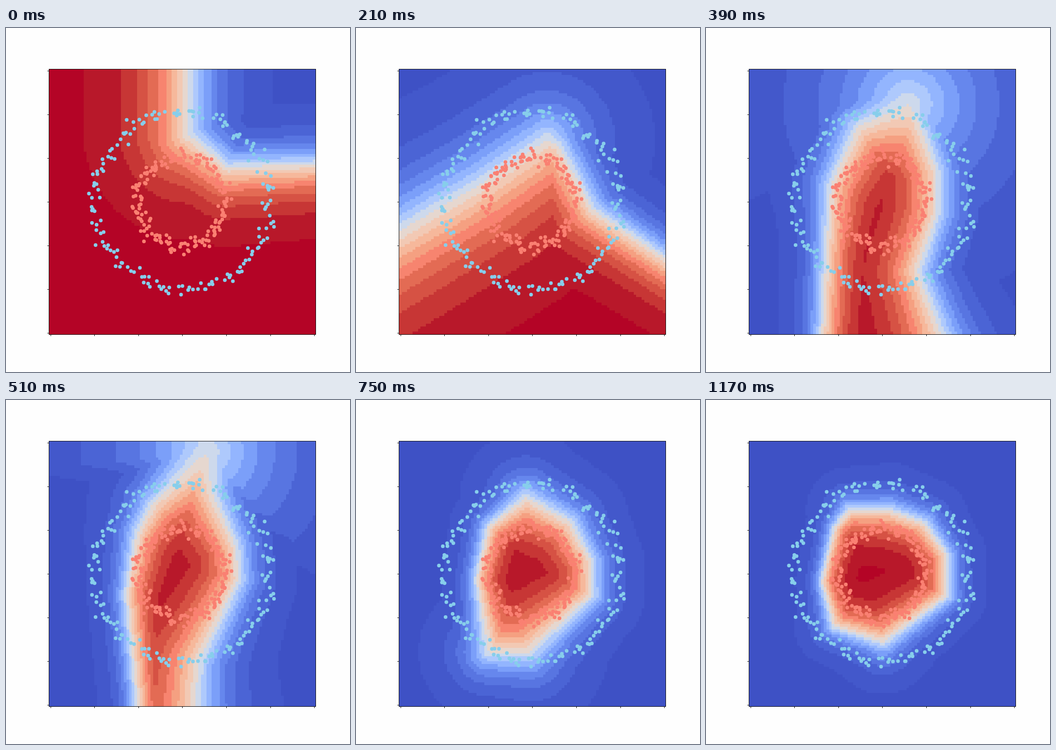
Write an HTML page with a canvas that moves like this. It is 748 px wide and 748 px high and loops after 1.2 s.

```html
<!DOCTYPE html>
<html lang="en">
<head>
<meta charset="utf-8">
<title>Decision boundary</title>
<style>
  html, body { margin: 0; width: 100%; height: 100%; overflow: hidden; background: #fefefe; }
  canvas { display: block; }
</style>
</head>
<body>
<canvas id="stage" width="748" height="748"></canvas>
<script>
const STEP = 30, STEPS = 40, GRID = 100;
const BOX = { x: 94, y: 90, w: 579, h: 576 };
const ctx = document.getElementById('stage').getContext('2d');

// Diverging colour bands, narrower towards both ends
const colors = ('3b4cc0 3e51c5 4358cb 4b64d5 5875e1 6687ed 7b9ff9 93b5fe aec9fc cdd9ec ' +
  'e6d7cf f2c9b4 f6b89b f5a081 f7846f e36b54 d65244 c73635 b8182a b40426').split(' ')
  .map(hex => [0, 2, 4].map(i => parseInt(hex.slice(i, i + 2), 16)));

function colorOf(score) {
  const p = 1 / (1 + Math.exp(-score));
  const eased = Math.acos(1 - 2 * p) / Math.PI;
  return colors[Math.round(eased * (colors.length - 1))];
}

// Boundary at some steps of the training: corner x, y and steepness there.
// The score grows with the distance from the boundary, positive inside.
const below = [[900, 1500, .04], [-900, 1500, .04]];
const states = [
  { step: 0, corners: [
    [-900, -900, .028], [402, -900, .028], [397, 232, .028], [482, 303, .037],
    [900, 288, .042], ...below] },
  { step: 3, corners: [
    [-900, -900, .024], [150, -900, .024], [335, 190, .024], [355, 242, .028],
    [440, 268, .033], [510, 335, .04], [900, 404, .041], ...below] },
  { step: 7, corners: [
    [-900, 1018, .017], [270, 340, .021], [415, 243, .022], [440, 255, .035],
    [515, 395, .038], [900, 655, .045], ...below] },
  { step: 13, corners: [
    [245, 800, .058], [262, 480, .05], [272, 340, .038], [330, 215, .03],
    [440, 165, .012], [458, 195, .03], [500, 310, .036], [502, 400, .036],
    [460, 530, .036], [560, 800, .024]] },
  { step: 17, corners: [
    [300, 800, .06], [262, 420, .06], [285, 290, .045], [320, 225, .036],
    [437, 112, .012], [447, 200, .03], [500, 320, .04], [505, 390, .04],
    [418, 570, .03], [405, 800, .022]] },
  { step: 25, corners: [
    [262, 390, .07], [288, 275, .06], [370, 212, .036], [465, 265, .04],
    [511, 350, .045], [512, 425, .045], [375, 548, .03], [288, 548, .034]] },
  { step: 39, corners: [
    [252, 395, .09], [280, 275, .08], [312, 239, .055], [400, 240, .05],
    [475, 268, .052], [522, 335, .06], [525, 425, .06], [385, 527, .046], [278, 492, .06]] }
];

// Distance to the edge a-b times the steepness blended along it
function climb(x, y, [ax, ay, ak], [bx, by, bk]) {
  const dx = bx - ax, dy = by - ay;
  const t = Math.max(0, Math.min(1, ((x - ax) * dx + (y - ay) * dy) / (dx * dx + dy * dy)));
  return Math.hypot(x - ax - t * dx, y - ay - t * dy) * (ak + (bk - ak) * t);
}

function buildField({ corners }) {
  const shape = new Path2D();
  for (const [x, y] of corners) shape.lineTo(x, y);
  shape.closePath();
  return Float32Array.from({ length: GRID * GRID }, (_, i) => {
    const x = BOX.x + (i % GRID + .5) * BOX.w / GRID;
    const y = BOX.y + (Math.floor(i / GRID) + .5) * BOX.h / GRID;
    const score = Math.min(...corners.map((a, j) => climb(x, y, a, corners[(j + 1) % corners.length])));
    return ctx.isPointInPath(shape, x, y) ? Math.min(score, 6.5) : -5.2 * Math.tanh(score / 4.7);
  });
}
for (const s of states) s.field = buildField(s);

let seed = 11;
const rand = () => (seed = seed * 16807 % 2147483647) / 2147483647;
const noise = () => (rand() + rand() + rand() + rand() - 2) * 14;

function ring(color, radius, count) {
  const pts = Array.from({ length: count }, (_, i) => {
    const a = i / count * 2 * Math.PI;
    return [383 + radius * Math.cos(a) + noise(), 377 + radius * Math.sin(a) + noise()];
  });
  return { color, pts };
}
const rings = [ring('#87ceeb', 191, 170), ring('#fa8072', 96, 175)];

const map = document.createElement('canvas');
map.width = map.height = GRID;
const mapCtx = map.getContext('2d');
const pixels = mapCtx.createImageData(GRID, GRID);

function drawField(step) {
  const next = Math.max(1, states.findIndex(s => s.step >= step));
  const a = states[next - 1], b = states[next];
  const mix = (step - a.step) / (b.step - a.step);
  for (let i = 0; i < GRID * GRID; i++) {
    const score = a.field[i] + (b.field[i] - a.field[i]) * mix;
    pixels.data.set(colorOf(score), i * 4);
    pixels.data[i * 4 + 3] = 255;
  }
  mapCtx.putImageData(pixels, 0, 0);
  ctx.imageSmoothingEnabled = false;
  ctx.drawImage(map, BOX.x, BOX.y, BOX.w, BOX.h);
}

function drawDots() {
  for (const { color, pts } of rings) {
    ctx.fillStyle = color;
    for (const [x, y] of pts) {
      ctx.beginPath();
      ctx.arc(x, y, 4, 0, 2 * Math.PI);
      ctx.fill();
    }
  }
}

function drawAxes() {
  ctx.strokeStyle = ctx.fillStyle = '#000';
  ctx.strokeRect(BOX.x - .5, BOX.y - .5, BOX.w + 1, BOX.h + 1);
  for (let i = 0; i < 7; i++) {
    ctx.fillRect(Math.round(96.5 + i * 95.6), 666, 1, 4);
    ctx.fillRect(90, 93 + i * 95, 4, 1);
  }
}

let shown = -1;
function tick() {
  const step = Math.floor(performance.now() / STEP) % STEPS;
  if (step !== shown) {
    shown = step;
    ctx.fillStyle = '#fefefe';
    ctx.fillRect(0, 0, 748, 748);
    drawField(step);
    drawDots();
    drawAxes();
  }
  requestAnimationFrame(tick);
}
tick();
</script>
</body>
</html>
```
